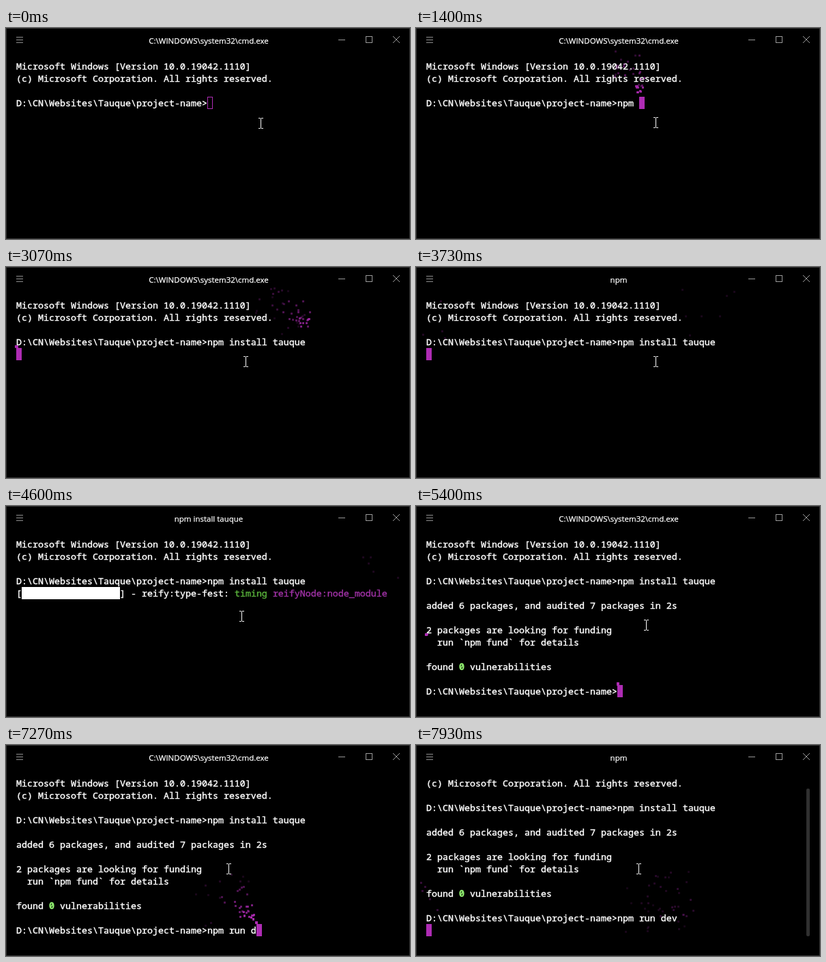
Recreate the animation shown at these times as an HTML page with a canvas. Size 592 px wide and 310 px high, loop 8 s.

```html
<!DOCTYPE html>
<html lang="en">
<head>
<meta charset="utf-8">
<title>Terminal</title>
<style>
html, body { margin: 0; width: 100%; height: 100%; overflow: hidden; background: #000; }
#stage { position: absolute; left: 0; top: 0; width: 592px; height: 310px; overflow: hidden; background: #000; }
#stage > * { position: absolute; }
#frame { inset: 0; border: 1px solid #333; box-sizing: border-box; }
#title {
  left: 97px; width: 400px; top: 9px; line-height: 20px; text-align: center; color: #fff;
  font-family: "Open Sans", "Noto Sans", sans-serif; font-size: 11.5px; white-space: pre;
  -webkit-text-stroke: 0.25px;
}
#text {
  left: 15px; top: 47px; margin: 0; color: #fff; line-height: 18px;
  font-family: "Noto Sans Mono", "DejaVu Sans Mono", monospace; font-size: 13.333px; font-weight: 500;
  -webkit-text-stroke: 0.4px;
}
#text .bar { display: inline-block; height: 18px; vertical-align: top; background: #fff; }
#text .green { color: #5ab43c; }
#text .pink { color: #a032a6; }
#text b { color: #90ee70; }
#cursor { left: 15px; top: 47px; width: 8px; height: 18px; box-sizing: border-box; border: 1px solid #ae2cb4; }
#cursor.on { background: #ae2cb4; }
#thumb { left: 572px; top: 64px; width: 5px; height: 217px; border-radius: 2px; background: #303030; }
svg, canvas { left: 0; top: 0; }
</style>
</head>
<body>
<div id="stage">
  <svg width="592" height="36" fill="none" stroke="#8c8c8c" shape-rendering="crispEdges">
    <path d="M15 13.5H25M15 17.5H25M15 21.5H25"/>
    <path stroke="#999" d="M487 17.5H497M527.5 12.5H536.5V21.5H527.5Z"/>
    <path stroke="#999" d="M567 12L577 22M577 12L567 22" shape-rendering="auto"/>
  </svg>
  <div id="title"></div>
  <div id="cursor"></div>
  <pre id="text"></pre>
  <div id="thumb"></div>
  <canvas id="sparks" width="592" height="310"></canvas>
  <svg id="mouse" width="7" height="16" shape-rendering="crispEdges">
    <path fill="#fff" d="M0 0H3V1H4V0H7V1H4V15H7V16H4V15H3V16H0V15H3V1H0Z"/>
  </svg>
  <div id="frame"></div>
</div>
<script>
const LOOP = 8000, STEP = 200 / 3, TICK = 1000 / 60;
const PROMPT = 'D:\\CN\\Websites\\Tauque\\project-name>';
const SHELL = 'C:\\WINDOWS\\system32\\cmd.exe';
const ENTER = 3065, PROGRESS = 3865, DONE = 5390, RUN = 7460;

const install = {
  text: 'npm install tauque', row: 3,
  keys: [865, 1000, 1130, 1330, 1530, 1600, 1665, 1800, 1865, 1930, 2065, 2130, 2265, 2460, 2600, 2730, 2800, 2930]
};
const dev = {
  text: 'npm run dev', row: 12,
  keys: [6265, 6330, 6460, 6600, 6930, 7065, 7130, 7200, 7265, 7330, 7390]
};
const titles = [[0, SHELL], [3130, 'npm'], [3800, 'npm install tauque'], [DONE, SHELL], [7530, 'npm']];
const mousePath = [
  [0, 373, 140], [133, 351, 139], [4200, 351, 139], [4267, 350, 141], [4600, 345, 162],
  [4733, 341, 172], [5330, 341, 172], [5600, 326, 182], [LOOP, 326, 182]
];

const $ = id => document.getElementById(id);
const ctx = $('sparks').getContext('2d');
const span = (cls, s) => `<span class="${cls}">${s}</span>`;
const typed = (cmd, t) => cmd.text.slice(0, cmd.keys.filter(k => k <= t).length);

function random(seed) {
  return () => {
    seed = (seed + 0x6D2B79F5) | 0;
    let r = Math.imul(seed ^ (seed >>> 15), 1 | seed);
    r = (r + Math.imul(r ^ (r >>> 7), 61 | r)) ^ r;
    return ((r ^ (r >>> 14)) >>> 0) / 4294967296;
  };
}

// Every cursor move throws a handful of sparks.
const rnd = random(21);
const sparks = [];
function burst(time, col, row) {
  const count = 5 + Math.round(rnd() * 5);
  for (let i = 0; i < count; i++) {
    sparks.push({ time, x: 15 + col * 8, y: 47 + row * 18, vx: rnd() * 2 - 1, vy: rnd() * 2 - 3.5 });
  }
}
for (const cmd of [install, dev]) {
  cmd.keys.forEach((k, i) => burst(k, PROMPT.length + i + 1, cmd.row));
}
burst(ENTER, 0, 4);
burst(PROGRESS, 68, 4);
burst(DONE, 0, 8);
burst(DONE, PROMPT.length, 12);
burst(RUN, 0, 12);

function drawSparks(t) {
  ctx.clearRect(0, 0, 592, 310);
  ctx.fillStyle = '#ae2cb4';
  for (const s of sparks) {
    const n = Math.floor((t - s.time) / TICK) + 1;
    const alpha = 0.96 ** n;
    if (n < 1 || alpha < 0.1) continue;
    ctx.globalAlpha = alpha;
    const y = s.y + s.vy * n + 0.0375 * n * (n + 1);
    ctx.fillRect(Math.round(s.x + s.vx * n - 1), Math.round(y - 1), 3, 3);
  }
}

function progress(t) {
  const cells = Math.min(18, 4 + Math.floor((t - PROGRESS) / 24));
  const spin = '-\\|/'[Math.floor(Math.max(0, t - 4590) / STEP) % 4];
  const task = t < 4260
    ? 'idealTree: ' + span('green', 'timing') + ' ' + span('pink', 'idealTree:#root Completed i')
    : 'reify:type-fest: ' + span('green', 'timing') + ' ' + span('pink', 'reifyNode:node_module');
  return '[' + span('bar', ' '.repeat(cells)) + ' '.repeat(18 - cells) + '] ' + spin + ' ' + task;
}

// Returns the lines on screen and the cursor cell.
function screen(t) {
  const first = typed(install, t);
  const lines = [
    'Microsoft Windows [Version 10.0.19042.1110]',
    '(c) Microsoft Corporation. All rights reserved.',
    '', PROMPT + first
  ];
  if (t < ENTER) return { lines, col: PROMPT.length + first.length, row: 3 };
  if (t < PROGRESS) return { lines, col: 0, row: 4 };
  if (t < DONE) return { lines: [...lines, progress(Math.min(t, 5000))], col: -1, row: 4 };
  const second = typed(dev, t);
  lines.push('', 'added 6 packages, and audited 7 packages in 2s', '',
    '2 packages are looking for funding', '  run `npm fund` for details', '',
    'found <b>0</b> vulnerabilities', '', PROMPT + second);
  if (t < RUN) return { lines, col: PROMPT.length + second.length, row: 12 };
  return { lines: lines.slice(1), col: 0, row: 12 };
}

function mouseAt(t) {
  const i = mousePath.findIndex(p => p[0] > t);
  const [t0, x0, y0] = mousePath[i - 1], [t1, x1, y1] = mousePath[i];
  const f = (t - t0) / (t1 - t0);
  return [Math.round(x0 + (x1 - x0) * f), Math.round(y0 + (y1 - y0) * f)];
}

const move = (el, x, y) => { el.style.transform = `translate(${x}px, ${y}px)`; };

function render(t) {
  const { lines, col, row } = screen(t);
  $('text').innerHTML = lines.join('\n');
  $('title').textContent = titles.filter(x => x[0] <= t).pop()[1];
  const cursor = $('cursor');
  cursor.hidden = col < 0;
  cursor.className = t > 460 ? 'on' : '';
  move(cursor, col * 8, row * 18);
  $('thumb').hidden = t < RUN;
  const [mx, my] = mouseAt(t);
  move($('mouse'), mx - 3, my - 8);
  drawSparks(t);
}

let start, last = -1;
function frame(now) {
  start ??= now;
  const step = Math.min(119, Math.floor(((now - start) % LOOP + 4) / STEP));
  if (step !== last) render(step * STEP);
  last = step;
  requestAnimationFrame(frame);
}
requestAnimationFrame(frame);
</script>
</body>
</html>
```
